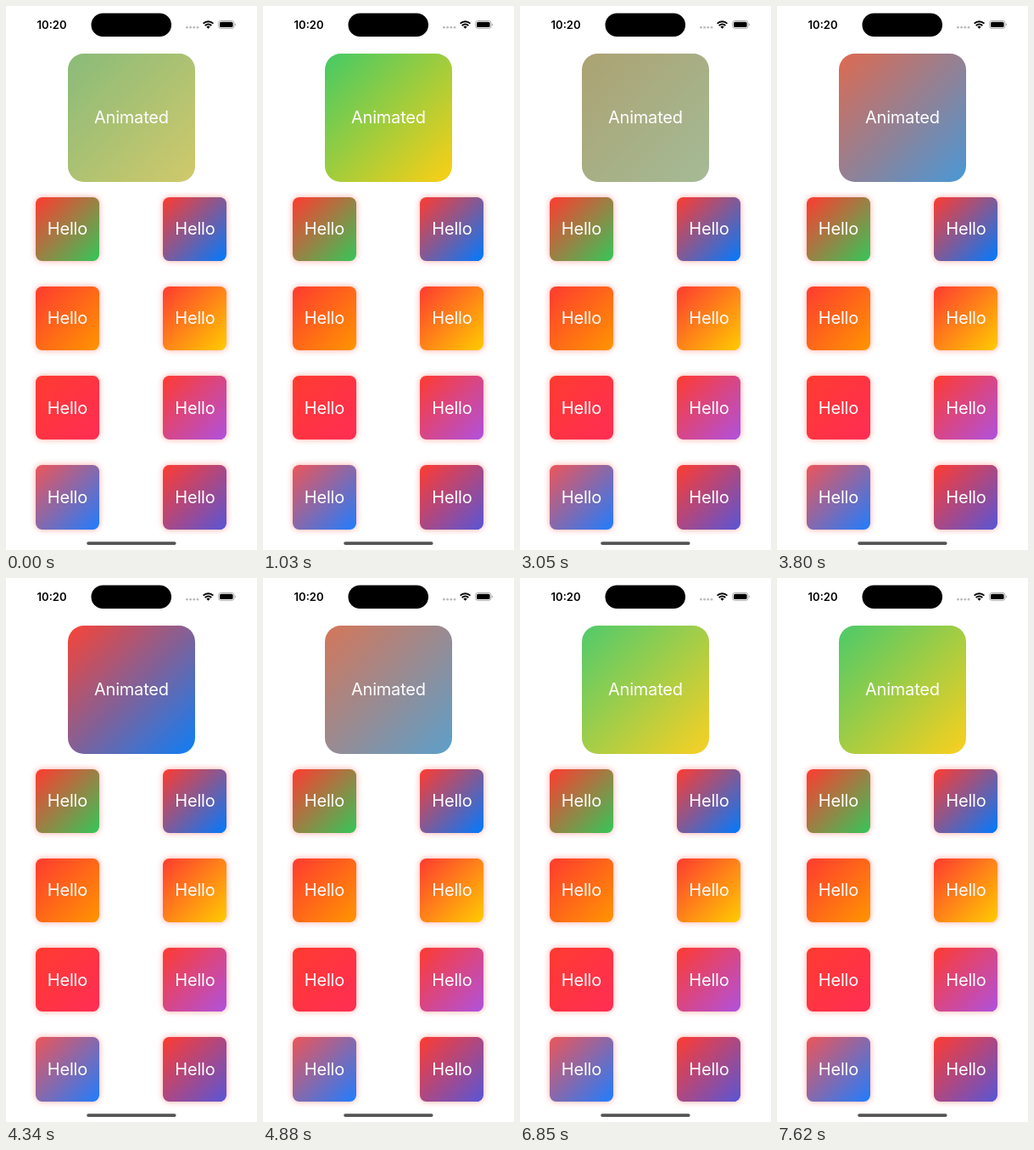
These frames come from a looping animation (296x640 px, 7710 ms). An HTML page:

```html
<!DOCTYPE html>
<html lang="en">
<head>
<meta charset="utf-8">
<title>Gradients</title>
<style>
  :root {
    --red: #ff3b30;
    --green: #34c759;
    --blue: #007aff;
    --yellow: #ffcc00;
  }
  html, body {
    margin: 0;
    width: 100%;
    height: 100%;
    overflow: hidden;
    background: #fff;
  }
  .stage {
    position: relative;
    width: 296px;
    height: 640px;
    overflow: hidden;
    font: 400 20px Inter, "Liberation Sans", sans-serif;
    letter-spacing: -.2px;
    color: #fff;
  }
  .bar {
    position: absolute;
    inset: 0;
    letter-spacing: 0;
  }
  .hero, .card {
    display: flex;
    align-items: center;
    justify-content: center;
  }
  .hero {
    position: absolute;
    left: 72.7px;
    top: 56.3px;
    width: 150.4px;
    height: 150.4px;
  }
  .hero::before, .hero::after {
    content: "";
    position: absolute;
    inset: 0;
    border-radius: 19px;
  }
  .hero::before {
    background: linear-gradient(135deg, var(--red), var(--blue));
    animation: warm 7710ms linear infinite;
  }
  .hero::after {
    background: linear-gradient(135deg, var(--green), var(--yellow));
    animation: fresh 7710ms linear infinite;
  }
  .hero span {
    position: relative;
    z-index: 1;
  }
  /* Three-second linear cross-fade, back and forth, cut at the loop end */
  @keyframes fresh {
    0% { opacity: .577 }
    16.47%, 94.29% { opacity: 1 }
    55.38% { opacity: 0 }
    100% { opacity: .853 }
  }
  @keyframes warm {
    0% { opacity: .423 }
    16.47%, 94.29% { opacity: 0 }
    55.38% { opacity: 1 }
    100% { opacity: .147 }
  }
  .grid {
    position: absolute;
    left: 34.8px;
    top: 224.6px;
    display: grid;
    grid-template-columns: repeat(2, 75.2px);
    grid-auto-rows: 75.2px;
    gap: 30.1px 75.3px;
  }
  .card {
    border-radius: 7.5px;
    background: linear-gradient(135deg, var(--from, var(--red)), var(--to));
    box-shadow: 0 0 7px rgba(255, 59, 48, .45);
  }
</style>
</head>
<body>
<div class="stage">
  <svg class="bar" width="296" height="640" viewBox="0 0 296 640">
    <text x="36.6" y="26.6" font-size="13" font-weight="600">10:20</text>
    <rect x="100.5" y="8.5" width="94.5" height="27.6" rx="13.8"/>
    <g fill="#bdbdbd">
      <circle cx="213.4" cy="25.2" r="1.4"/>
      <circle cx="217.6" cy="25.2" r="1.4"/>
      <circle cx="221.8" cy="25.2" r="1.4"/>
      <circle cx="226" cy="25.2" r="1.4"/>
    </g>
    <g fill="none" stroke="#000" stroke-width="1.8">
      <path d="M232.6 20.6a8.6 8.6 0 0 1 11.8 0"/>
      <path d="M234.7 23a5.5 5.5 0 0 1 7.6 0"/>
    </g>
    <path d="M236.4 24.6a3 3 0 0 1 4.2 0l-2.1 2.2z"/>
    <rect x="250.6" y="17.4" width="18.4" height="9" rx="2.8" fill="none" stroke="#a0a0a0" stroke-width=".9"/>
    <rect x="252" y="18.8" width="15.6" height="6.2" rx="1.6"/>
    <path d="M270.1 20.4a1.7 1.7 0 0 1 0 3z" fill="#a0a0a0"/>
  </svg>
  <div class="hero"><span>Animated</span></div>
  <div class="grid">
    <div class="card" style="--to: var(--green)">Hello</div>
    <div class="card" style="--to: var(--blue)">Hello</div>
    <div class="card" style="--to: #ff9500">Hello</div>
    <div class="card" style="--to: var(--yellow)">Hello</div>
    <div class="card" style="--to: #ff2d55">Hello</div>
    <div class="card" style="--to: #af52de">Hello</div>
    <div class="card" style="--from: #ee5558; --to: #1f7dff">Hello</div>
    <div class="card" style="--to: #5856d6">Hello</div>
    <div class="card" style="--to: var(--red)">Hello</div>
  </div>
  <svg class="bar" width="296" height="640" viewBox="0 0 296 640">
    <rect x="95.2" y="630.2" width="105.4" height="3.8" rx="1.9" fill="#555"/>
  </svg>
</div>
</body>
</html>
```
